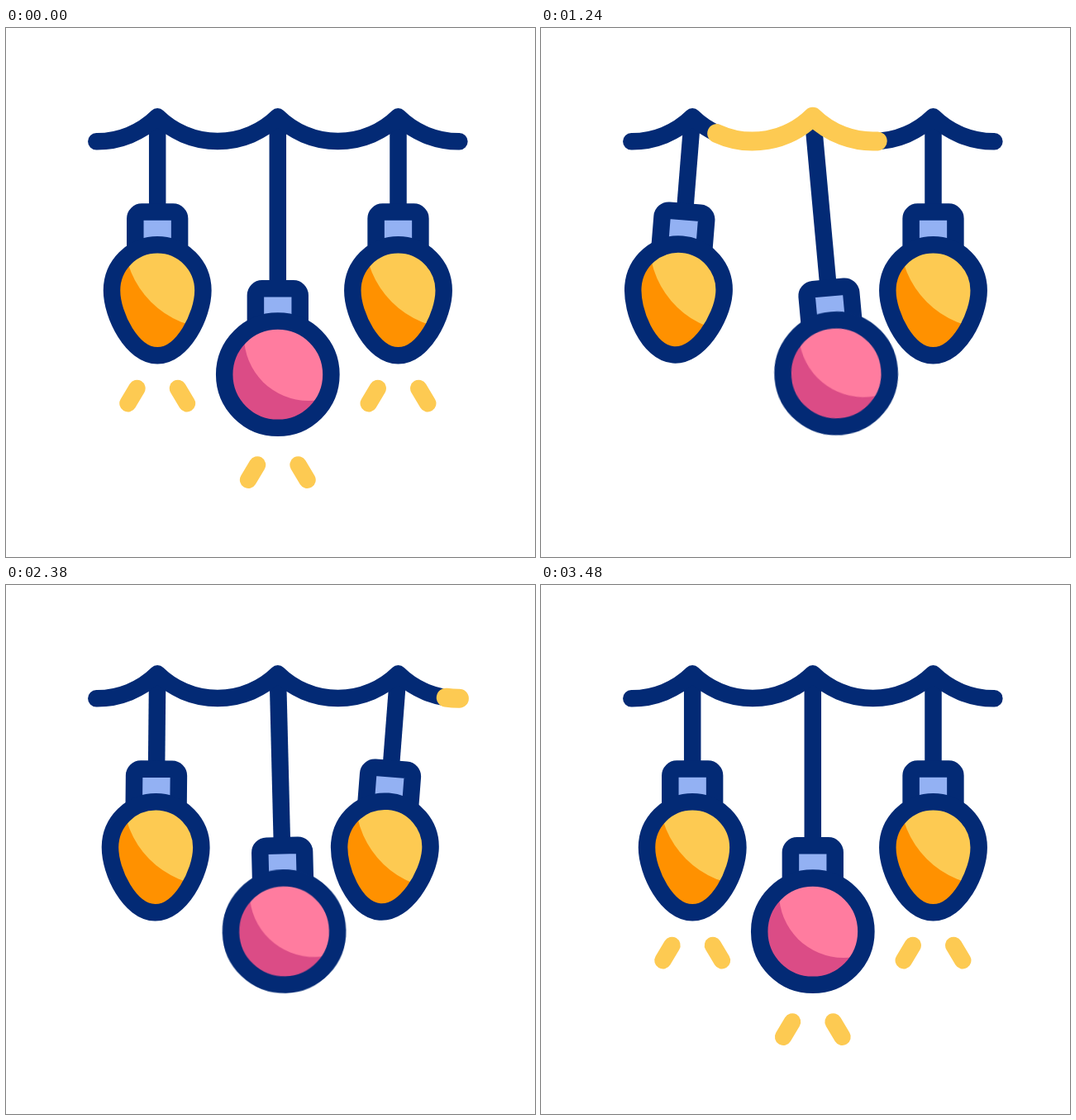
An HTML page that plays this animation: 640x640 px, repeating every 3.5 s.

```html
<!DOCTYPE html>
<html lang="en">
<head>
<meta charset="utf-8">
<title>String lights</title>
<style>
  html, body { margin: 0; width: 100%; height: 100%; overflow: hidden; background: #fff; }
  svg { display: block; width: 100%; height: 100%; }
  .line { fill: none; stroke: #032a75; stroke-width: 20.5; stroke-linecap: round; stroke-linejoin: round; }
  .stem, .cap { stroke-linecap: butt; }
  .cap { fill: #93b1f3; }
  .ray { stroke: #fdca52; }
  #glow { stroke: #fdca52; stroke-width: 23; }
</style>
</head>
<body>
<svg viewBox="0 0 640 640">
  <defs>
    <path id="drop" d="M0 155C30.5 155 55.2 179.7 55.2 210.2C55.2 240.7 30.5 289 0 289C-30.5 289 -55.2 240.7 -55.2 210.2C-55.2 179.7 -30.5 155 0 155Z"/>
    <circle id="ball" cy="311.9" r="64.6"/>
    <clipPath id="dropClip"><use href="#drop"/></clipPath>
    <clipPath id="ballClip"><use href="#ball"/></clipPath>
    <path id="cap" class="line cap" d="M-26.9 160V123.3a8 8 0 0 1 8-8H18.9a8 8 0 0 1 8 8V160"/>
    <g id="dropLight">
      <path class="line stem" d="M0 0V115"/>
      <use href="#cap"/>
      <use href="#drop" fill="#ff9100"/>
      <circle cx="69.8" cy="146.2" r="110" fill="#fdca52" clip-path="url(#dropClip)"/>
      <use href="#drop" class="line"/>
    </g>
    <g id="ballLight">
      <path class="line stem" d="M0 0V208"/>
      <use href="#cap" y="92.7"/>
      <use href="#ball" fill="#db4c86"/>
      <circle cx="37.2" cy="265.7" r="78" fill="#ff7c9f" clip-path="url(#ballClip)"/>
      <use href="#ball" class="line"/>
    </g>
    <path id="rays" class="line ray" d="M-24.8 328.6L-35.7 346.9M24.8 328.6L35.7 346.9"/>
  </defs>
  <g id="shine">
    <use href="#rays" x="183.2" y="107.3"/>
    <use href="#rays" x="328.8" y="199.8"/>
    <use href="#rays" x="474.5" y="107.3"/>
  </g>
  <use id="left" href="#dropLight"/>
  <use id="right" href="#dropLight"/>
  <use id="middle" href="#ballLight"/>
  <path id="wire" class="line"/>
  <path id="glow" class="line" pathLength="1"/>
</svg>
<script>
  const LOOP = 3500, SWING = 400, PIVOT_Y = 107.3;
  const ANGLES = [0, 8, -6, 4, -2, 0];
  const get = id => document.getElementById(id);
  const shine = get('shine'), glow = get('glow');
  const lights = [
    { el: get('left'), x: 183.2, start: 520 },
    { el: get('middle'), x: 328.8, start: 1000 },
    { el: get('right'), x: 474.5, start: 1480 }
  ];

  const arcs = [183.2, 328.8, 474.5, 548.4]
    .map((x, i) => `A104 104 0 0 0 ${x} ${i < 3 ? PIVOT_Y : 137.3}`).join('');
  for (const el of [get('wire'), glow]) el.setAttribute('d', 'M109.3 137.3' + arcs);

  // Eased progress from time a to time b, clamped to 0..1
  function ease(t, a, b) {
    const p = Math.min(1, Math.max(0, (t - a) / (b - a)));
    return p * p * (3 - 2 * p);
  }

  function swing(t) {
    let angle = 0;
    for (let i = 1; i < ANGLES.length; i++)
      angle += (ANGLES[i] - ANGLES[i - 1]) * ease(t, (i - 1) * SWING, i * SWING);
    return angle;
  }

  function draw(t) {
    for (const { el, x, start } of lights)
      el.setAttribute('transform', `translate(${x} ${PIVOT_Y}) rotate(${-swing(t - start)})`);

    const head = ease(t, 0, 2000), tail = ease(t, 600, 2600), len = head - tail;
    glow.style.display = len > 1e-5 ? '' : 'none';
    glow.setAttribute('stroke-dasharray', `${len} 2`);
    glow.setAttribute('stroke-dashoffset', -tail);

    shine.setAttribute('opacity', 1 - ease(t, 0, 500) + ease(t, 3000, 3480));
  }

  const began = performance.now();
  function tick() {
    draw((performance.now() - began) % LOOP);
    requestAnimationFrame(tick);
  }
  draw(0);
  requestAnimationFrame(tick);
</script>
</body>
</html>
```
